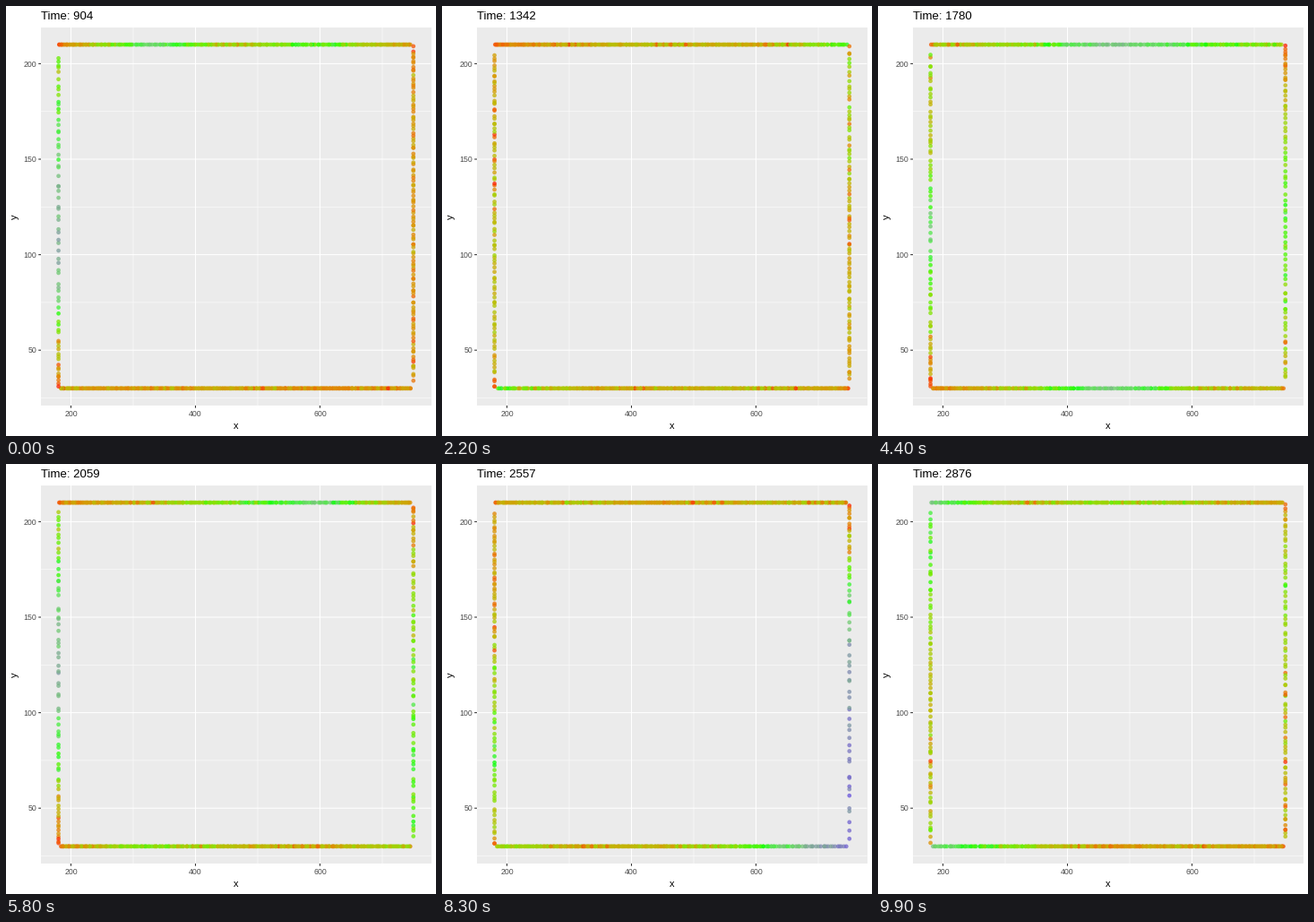
Write a matplotlib script that moves like this. It is 480 px wide and 480 px high and loops after 10000 ms.

```python
import numpy as np
import matplotlib.pyplot as plt
from matplotlib.animation import FuncAnimation

plt.rcParams["font.family"] = "Liberation Sans"

SIZE, DPI = 480, 72
FRAMES, INTERVAL = 100, 100
T0, T1 = 904, 2876
PANEL = (39, 24, 474.5, 446)  # left, top, right, bottom
X0, X1, Y0, Y1 = 180, 750, 30, 210

# Speed (0 halted, 10 free) at five even points of each road,
# from low to high coordinate: left, right, bottom, top.
STEPS = [0, 22, 44, 58, 72, 83, 99]
SPEED = np.array([
    [[1, 6, 7, 5.5, 4], [2, 1.8, 2, 2, 1.5], [2.5, 2, 2.5, 1.7, 2], [1.5, 6, 3.5, 5, 2]],
    [[2.5, 3, 3, 2.5, 2], [2, 2.5, 2.5, 3.5, 4], [5, 2.5, 2.5, 3, 2], [1.5, 2.5, 3, 2.5, 5]],
    [[1, 4.5, 6, 3, 4], [3, 4.5, 5, 4, 1], [1.5, 3.5, 6.5, 3.5, 3], [3, 4, 6.5, 5, 4]],
    [[1, 5, 7, 5.5, 4], [4.5, 5, 4.5, 4, 1.5], [2, 4.5, 3, 2.5, 4], [1.5, 3, 4.5, 6, 2]],
    [[2, 3.5, 3.5, 4, 2], [8.6, 8.5, 7.7, 5.5, 1], [2, 6, 8.3, 8.5, 8.5], [2.5, 2.5, 2, 4.5, 4]],
    [[2.5, 5, 3.5, 2, 2], [8.6, 8.2, 7.5, 5.5, 1], [4, 2.5, 3, 5, 8.3], [2.5, 3, 2, 3, 2.5]],
    [[4, 3, 3, 4.5, 5.5], [2.5, 3, 3.5, 4.5, 2], [6, 4, 2, 2.7, 2], [6, 3, 4, 3.5, 2]],
])


def px(x):
    return 72.5 + (np.asarray(x) - 200) * 0.695


def py(y):
    return 64.4 + (200 - np.asarray(y)) * 2.132


# Colour scale red - green - blue, blended in CIE Lab
RGB2XYZ = np.array([[0.4124, 0.3576, 0.1805],
                    [0.2126, 0.7152, 0.0722],
                    [0.0193, 0.1192, 0.9505]])
WHITE = RGB2XYZ.sum(axis=1)


def to_lab(rgb):
    f = np.cbrt(np.maximum(RGB2XYZ @ rgb / WHITE, 1e-4))
    return np.array([116 * f[1] - 16, 500 * (f[0] - f[1]), 200 * (f[1] - f[2])])


def to_rgb(lab):
    fy = (lab[:, 0] + 16) / 116
    f = np.stack([fy + lab[:, 1] / 500, fy, fy - lab[:, 2] / 200], axis=1)
    xyz = np.where(f > 6 / 29, f ** 3, (f - 4 / 29) * 0.1284) * WHITE
    lin = np.clip(xyz @ np.linalg.inv(RGB2XYZ).T, 0, 1)
    return np.where(lin > 0.0031308, 1.055 * lin ** (1 / 2.4) - 0.055, 12.92 * lin)


STOPS = np.array([to_lab(c) for c in np.eye(3)])
RAMP = np.linspace(0, 10, 256)
SCALE = to_rgb(np.stack([np.interp(RAMP, [0, 5, 10], STOPS[:, j]) for j in range(3)], axis=1))


def road(rng, speeds, lo, hi, forward):
    """Car positions and speeds on one road; faster cars keep larger gaps."""
    s = np.linspace(lo, hi, 600)
    v = np.interp(s, np.linspace(lo, hi, 5), speeds)
    count = np.cumsum(1 / (0.9 + 0.33 * v)) * (s[1] - s[0])
    k = np.arange(int(count[-1])) + rng.uniform(0, 1)
    pos = np.interp(k + rng.normal(0, 0.35, k.size), count, s)
    v = np.interp(pos, s, v)

    # stop-and-go ripple inside the slow stretches
    ahead = pos if forward else -pos
    phase = (ahead / rng.uniform(10.5, 13) + rng.uniform()) % 1
    group = 0.5 + 0.5 * np.sin(ahead / rng.uniform(24, 34) + rng.uniform(0, 6.3))
    jam = np.clip((5.2 - v) / 2, 0, 1) * np.clip(group * 1.5 - 0.2, 0, 1)
    v = v * (1 - jam * np.exp(-5 * phase)) + 0.7 * jam * phase
    v = v + rng.normal(0, 0.35, pos.size)

    # queue at the junction
    gap = (hi - pos) if forward else (pos - lo)
    v = np.where(v < 6, v * np.clip(0.3 + gap / 9, 0, 1), v)
    return pos, np.clip(v, 0.15, 9)


def cars(i):
    rng = np.random.default_rng(500 + i)
    flat = SPEED.reshape(len(STEPS), -1)
    now = np.array([np.interp(i, STEPS, c) for c in flat.T]).reshape(4, 5)
    xs, ys, vs = [], [], []
    for n, (lo, hi, forward) in enumerate([(Y0 + 1, Y1 - 3.5, False), (Y0 + 4, Y1 - 0.5, True),
                                           (X0 + 4, X1 - 1.5, True), (X0 + 1, X1 - 3, False)]):
        pos, v = road(rng, now[n], lo, hi, forward)
        if n < 2:
            xs.append(np.full(pos.size, (X0, X1)[n]))
            ys.append(pos)
        else:
            xs.append(pos)
            ys.append(np.full(pos.size, (Y0, Y1)[n - 2]))
        vs.append(v)
    x, y, v = map(np.concatenate, (xs, ys, vs))
    order = rng.permutation(x.size)
    xy = np.stack([px(x), py(y)], axis=1)[order]
    rgb = SCALE[(v[order] * 25.5).astype(int)]
    return xy, np.column_stack([rgb, np.full(x.size, 0.75)])


fig = plt.figure(figsize=(SIZE / DPI, SIZE / DPI), dpi=DPI, facecolor="white")
ax = fig.add_axes([0, 0, 1, 1])
ax.set_xlim(0, SIZE)
ax.set_ylim(SIZE, 0)
ax.axis("off")

left, top, right, bottom = PANEL
ax.add_patch(plt.Rectangle((left, top), right - left, bottom - top, fc="#EBEBEB", lw=0, zorder=0))


def line(xs, ys, color, width):
    ax.plot(xs, ys, color=color, lw=width, solid_capstyle="butt", snap=False, zorder=1)


def label(x, y, text, size, color="black", **kw):
    return ax.text(x, y, text, fontsize=size, color=color, va="baseline", **kw)


for x in (300, 500, 700):
    line([px(x)] * 2, [top, bottom], "white", 0.53)
for y in (25, 75, 125, 175):
    line([left, right], [py(y)] * 2, "white", 0.53)
for x in (200, 400, 600):
    line([px(x)] * 2, [top, bottom], "white", 1.07)
    line([px(x)] * 2, [bottom, bottom + 2.75], "#333333", 1.07)
    label(px(x), 457.8, str(x), 8.8, "#4D4D4D", ha="center")
for y in (50, 100, 150, 200):
    line([left, right], [py(y)] * 2, "white", 1.07)
    line([left - 2.75, left], [py(y)] * 2, "#333333", 1.07)
    label(34, py(y) + 3.2, str(y), 8.8, "#4D4D4D", ha="right")

label(256.7, 472, "x", 11, ha="center")
ax.text(13, 235, "y", fontsize=11, rotation=90, rotation_mode="anchor",
        ha="center", va="baseline")
title = label(39, 14.8, "", 13.2)
dots = ax.scatter([], [], s=4.7 ** 2, linewidths=0, zorder=2)


def draw(i):
    xy, rgba = cars(i)
    dots.set_offsets(xy)
    dots.set_facecolors(rgba)
    title.set_text(f"Time: {round(T0 + (T1 - T0) * i / (FRAMES - 1))}")
    return dots, title


anim = FuncAnimation(fig, draw, frames=FRAMES, interval=INTERVAL, repeat=True, repeat_delay=0)
plt.show()
```
